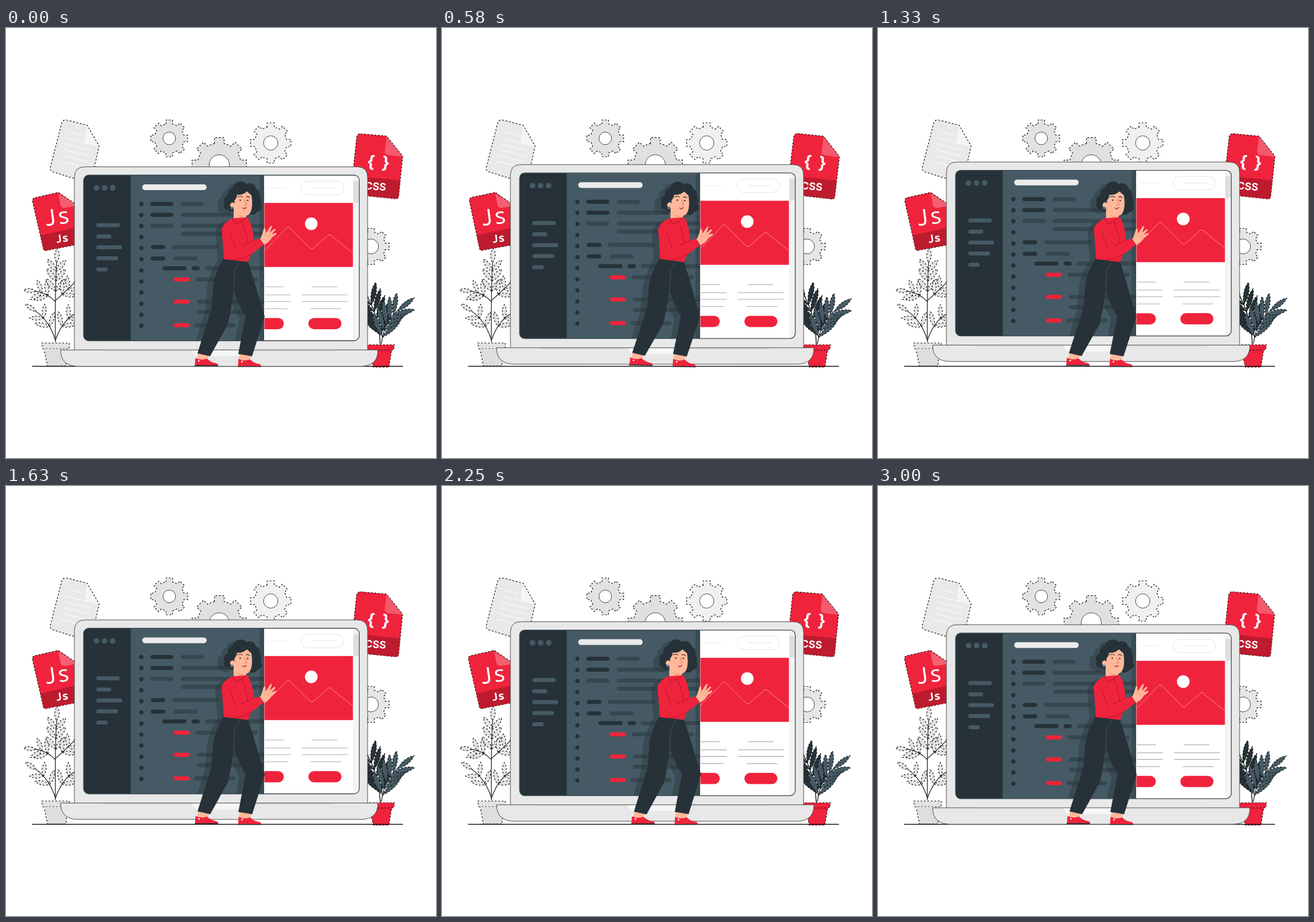
An HTML page that plays this animation: 748 px wide and 748 px high, repeating every 3.04 s.

```html
<!DOCTYPE html>
<html lang="en">
<head>
<meta charset="utf-8">
<title>Web development</title>
<style>
html, body { margin: 0; width: 100%; height: 100%; overflow: hidden; background: #fff; }
svg { display: block; width: 100vw; height: 100vh; }
.rough { stroke: #111; stroke-width: 1.2; stroke-dasharray: 3 3; }
text { fill: #fff; font-family: Inter, Lato, sans-serif; font-weight: 700; }
.mono { font-family: "Noto Sans Mono", "DejaVu Sans Mono", monospace; }
.big { font-weight: 400; }
</style>
</head>
<body>
<svg id="stage" viewBox="0 0 748 748" xmlns="http://www.w3.org/2000/svg"></svg>
<script>
const RED = '#f0233c', DEEP = '#bd1b2e', INK = '#263238', SLATE = '#455a64',
  MID = '#37474f', PALE = '#e8e8e8', SKIN = '#ffb89a';
const LOOP = 3040;

const path = (d, fill, extra = '') => `<path d="${d}" fill="${fill}" ${extra}/>`;
const rough = (d, fill) => path(d, fill, 'class="rough"');
const line = (d, color, w = 1.1) => path(d, 'none', `stroke="${color}" stroke-width="${w}" stroke-linecap="round" stroke-linejoin="round"`);
const rect = (x, y, w, h, fill, r = 0, extra = '') =>
  `<rect x="${x}" y="${y}" width="${w}" height="${h}" rx="${r}" fill="${fill}" ${extra}/>`;
const dot = (x, y, r, fill) => `<circle cx="${x}" cy="${y}" r="${r}" fill="${fill}"/>`;
const bar = (x1, x2, y, fill, h = 7) => rect(x1, y - h / 2, x2 - x1, h, fill, h / 2);
const label = (str, x, y, deg, size, extra = '') =>
  `<text transform="translate(${x} ${y}) rotate(${deg})" font-size="${size}" ${extra}>${str}</text>`;
const group = (id, body) => `<g id="${id}">${body}</g>`;
const ring = (x, y, r) => `M${x - r} ${y}a${r} ${r} 0 1 1 ${2 * r} 0a${r} ${r} 0 1 1 ${-2 * r} 0Z`;
const polar = (x, y, r, deg) => {
  const a = deg * Math.PI / 180;
  return `${(x + r * Math.cos(a)).toFixed(1)} ${(y + r * Math.sin(a)).toFixed(1)}`;
};

function gear(x, y, R, hole, fill) {
  const r = R * 0.79;
  let d = '';
  for (let i = 0; i < 8; i++) {
    const a = i * 45 - 90;
    d += i ? `A${r} ${r} 0 0 1 ${polar(x, y, r, a - 13)}` : `M${polar(x, y, r, a - 13)}`;
    d += `L${polar(x, y, R, a - 10)}L${polar(x, y, R, a + 10)}L${polar(x, y, r, a + 13)}`;
  }
  d += `A${r} ${r} 0 0 1 ${polar(x, y, r, -103)}Z`;
  return rough(d, fill) + path(ring(x, y, hole), '#fff', 'stroke="#333" stroke-width=".9"');
}

function leaf(x, y, deg, len, w, fill) {
  const tip = polar(x, y, len, deg);
  const side = s => polar(x, y, len * 0.6, deg + s * Math.atan2(w, len * 0.6) * 57.3);
  return rough(`M${x} ${y}Q${side(1)} ${tip}Q${side(-1)} ${x} ${y}Z`, fill);
}

// A curved stem with leaf pairs and one leaf at the tip.
function branch([x0, y0, x1, y1, x2, y2], n, len, w, spread, fill, stem, start = 0.3) {
  let out = '';
  for (let i = 0; i <= n; i++) {
    const t = start + (1 - start) * i / n, u = 1 - t;
    const x = +(u * u * x0 + 2 * u * t * x1 + t * t * x2).toFixed(1);
    const y = +(u * u * y0 + 2 * u * t * y1 + t * t * y2).toFixed(1);
    const deg = Math.atan2(u * (y1 - y0) + t * (y2 - y1), u * (x1 - x0) + t * (x2 - x1)) * 57.3;
    const size = len * (1 - 0.2 * t);
    const turns = i === n ? [0] : [-spread, spread];
    out += turns.map(s => leaf(x, y, deg + s, size, w, fill)).join('');
  }
  return out + line(`M${x0} ${y0}Q${x1} ${y1} ${x2} ${y2}`, stem, 1.4);
}

function leftPlant() {
  const stems = [
    [[86, 546, 85, 460, 88, 408], 3, 31, 9, 38, 0.58],
    [[86, 476, 70, 460, 52, 458], 2, 27, 8, 50, 0.4],
    [[86, 474, 100, 462, 118, 444], 2, 27, 8, 48, 0.4],
    [[86, 543, 76, 510, 52, 493], 2, 28, 8, 48, 0.4],
    [[86, 543, 98, 508, 122, 496], 2, 28, 8, 48, 0.4]
  ];
  return stems.map(([p, n, len, w, s, t]) => branch(p, n, len, w, s, '#e2e2e2', '#333', t)).join('') +
    rough('M66 557L72 588H104L108 557Z', '#dedede') + rough('M62 548H110V558H64Z', '#e2e2e2') +
    line('M66 559H108', '#f4f4f4');
}

function rightPlant() {
  const pot = rough('M632 559L639 590H666L671 559Z', RED) + rough('M620 551H676L674 560H622Z', RED) +
    line('M632 561H671', DEEP);
  const fronds = branch([651, 550, 649, 505, 630, 470], 5, 48, 9, 35, INK, '#111', 0.2) +
    branch([653, 549, 658, 510, 681, 492], 5, 46, 9, 34, SLATE, INK, 0.15);
  return group('fronds', fronds) + pot;
}

const paper = () => rough('M105 160L141 169L162 205L148 268L119 262L81 250Q76 248 77 243L97 165Q99 159 105 160Z', '#e9e9e9') +
  path('M141 170L137 193Q136 199 142 201L161 206Z', '#f5f5f5') +
  [[111, 181, 20], [107, 192, 36], [104, 202, 42], [102, 212, 42], [99, 222, 42], [96, 232, 30]]
    .map(([x, y, w]) => line(`M${x} ${y}l${w} ${w / 4}`, '#f8f8f8', 1.8)).join('');

const jsFile = () => rough('M51 295L91 286L125 309L132 375L70 387Q66 388 65 384L46 301Q46 296 51 295Z', RED) +
  path('M60 361L130 345V375L70 387Q66 388 65 384Z', DEEP) +
  path('M91 288L95 308Q96 313 102 313L125 309Z', '#f55f72') +
  label('Js', 67, 345, -8, 39, 'class="mono big"') + label('Js', 87, 374, -8, 19, 'class="mono"');

const cssFile = () => rough('M617 184L662 188L690 223L683 293Q682 298 677 297L606 290L600 284L610 190Q611 184 617 184Z', RED) +
  path('M604 257L686 265L683 293Q682 298 677 297L602 289Z', DEEP) +
  path('M662 189L659 215Q659 220 664 221L690 224Z', '#f4596d') +
  label('{', 627, 242, 6, 29) + label('}', 653, 244, 6, 29) + label('CSS', 624, 280.5, 4, 18);

const hair = [[408, 281, 14], [424, 281, 11], [398, 289, 12], [388, 300, 9], [386, 309, 7], [395, 311, 9],
  [432, 289, 10], [434, 300, 10], [436, 311, 9], [429, 316, 9]].map(c => ring(...c)).join('');
const torso = 'M394 331Q379 337 375 350Q378 380 379 402L421 407L426 394L448 377L442 366L431 369Q429 342 420 329Z';
const pants = 'M378 401Q364 425 361 445L357 490L333 566L355 571L386 515Q392 490 396 456Q407 488 417 501L404 567L428 571L450 502Q438 460 421 406Z';
const shade = hair + torso + pants;

function screen() {
  const code = [
    [306, 251, 291, INK], [306, 304, 344, MID], [325, 251, 291, INK], [325, 304, 398, MID],
    [344, 251, 291, MID], [344, 304, 460, MID], [358, 304, 460, MID],
    [381, 252, 277, INK], [381, 289, 371, MID], [401, 252, 277, INK], [401, 292, 333, MID],
    [418, 272, 314, INK], [418, 323, 337, INK], [418, 346, 460, MID],
    [437.5, 292, 320, RED], [437.5, 330, 438, MID], [476, 292, 320, RED], [476, 332, 460, MID],
    [494, 332, 460, MID], [517, 292, 320, RED], [517, 328, 399, MID]
  ];
  const side = [[343, 198], [362.5, 183], [381.5, 202], [400.5, 195], [420, 177]];
  let s = rect(135, 256, 315, 288, SLATE) + rect(135, 256, 82, 288, INK);
  s += [157.5, 171.5, 185.5].map(x => dot(x, 278, 5, SLATE)).join('');
  s += side.map(([y, x]) => bar(157, x, y, SLATE)).join('');
  s += bar(237, 349, 277, '#ebebeb', 10);
  for (let i = 0; i < 12; i++) s += dot(235.5, 306 + i * 19.27, 3.7, INK);
  s += code.map(([y, a, b, c]) => bar(a, b, y, c)).join('');
  s += rect(441, 256, 9, 288, INK, 0, 'opacity=".35"');
  s += `<g clip-path="url(#codeClip)">${path(shade, INK, 'id="shade" opacity=".4"')}</g>`;
  return s + page();
}

function page() {
  const copy = [[450.3, 451, 483, 532, 576], [464.3, 451, 495, 515, 594], [475.8, 451, 495, 515, 594], [488.3, 451, 490, 530, 583]];
  let s = rect(449, 256, 165, 288, '#fff') + rect(604, 256, 10, 288, '#f4f4f4') + rect(604, 266, 9.5, 38, '#dedede', 3);
  s += line('M455 278H488', '#ededed') + rect(513.5, 266.5, 74, 23.5, 'none', 11.5, 'stroke="#e3e3e3"') + line('M532 278H572', '#e6e6e6');
  s += rect(449.5, 304.3, 154, 111.4, RED) + dot(531, 340.5, 11, '#fff');
  s += line('M450 387L487 349Q491 344 495 349L528 382Q532 387 536 382L559 362Q563 357 567 362L603 391', '#f98d99', 1);
  s += copy.map(([y, a, b, c, d]) => line(`M${a} ${y}H${b}M${c} ${y}H${d}`, '#aaa')).join('');
  return s + path('M449.5 504.5H473.5a9.7 9.7 0 0 1 0 19.5H449.5Z', RED) + bar(526, 583.5, 514.2, RED, 19.5);
}

function laptop() {
  const edge = 'stroke="#4a4a4a" stroke-width="1"';
  return path('M119 561V260Q119 241.5 137 241.5H611Q629 241.5 629 260V561Z', PALE, edge) +
    `<g clip-path="url(#screenClip)">${screen()}</g>` +
    rect(135, 256, 479.5, 288, 'none', 9, `stroke="${MID}" stroke-width="1.3"`) +
    path('M95 560H647Q647 588.5 617 588.5H126Q95 588.5 95 560Z', PALE, edge) +
    path('M323 561H412Q410 571 401 571H336Q326 571 323 561Z', '#f6f6f6') +
    line('M170 561.5H323M412 561.5H570', '#d6d6d6', 1.5);
}

function shoe(x, y) {
  return path(`M${x} ${y}Q${x + 10} ${y + 5} ${x + 20} ${y + 1}Q${x + 27} ${y + 8} ${x + 36} ${y + 9}Q${x + 40} ${y + 10} ${x + 39} ${y + 13}H${x - 1}Z`, RED) +
    line(`M${x - 1} ${y + 13.3}H${x + 39}`, INK, 1.5) + dot(x + 6, y + 5, 1.4, '#fff');
}

function woman() {
  const fingers = 'M442 367Q446 360 448 350L451 348L452 357L460 345L463 344L459 356L467 349L469 351L462 359L470 356L470 359L462 365Q459 372 449 377Z';
  let s = path('M334 565L352 569L350 578Q341 582 332 575ZM406 566L426 570L424 579Q415 582 405 577Z', SKIN);
  s += shoe(329.5, 574) + shoe(404.5, 575.5) + path(pants, INK);
  s += line('M405 408Q404 418 396 422M398 424L396 456', '#4a5a62', 0.9);
  s += path(hair, INK);
  s += path('M396 308V334Q405 341 418 331V318Z', SKIN) + path('M400 324Q409 329 417 326L409 329Z', '#e8957a');
  s += path('M397 294C403 281 424 281 427 291C429 304 429 317 423 324C416 330 404 327 399 318Z', SKIN);
  s += dot(394.5, 308, 4.6, SKIN) + dot(393, 313, 2.3, '#607d8b');
  s += path('M395 302Q401 298 402 290Q413 291 419 284Q424 289 430 293L429 277L402 276L392 290Z', INK);
  s += dot(407.5, 299.5, 1.3, INK) + dot(420.5, 300, 1.3, INK);
  s += line('M403 294Q407 291 411 294M418 294Q421 292 424 295', INK, 1.2);
  s += line('M415 299L419 307L414.5 308.5', '#d9775f', 1) + line('M412 313Q415 316 418 312', '#b5303c', 1.6);
  s += path(torso, RED) + path(fingers, SKIN) + line('M452 357L450 362M459 356L454 363M462 359L456 366', '#e8957a', 0.8);
  s += line('M394 331L400 341L410 336L418 330M410 336Q419 356 420 374M389 354Q396 374 400 383M410 379L431 369M395 403Q409 404 425 394', '#b5182c', 1);
  return s;
}

const clip = (id, box) => `<clipPath id="${id}">${box}</clipPath>`;
document.getElementById('stage').innerHTML =
  '<defs>' + clip('screenClip', rect(135, 256, 479.5, 288, '#000', 9)) + clip('codeClip', rect(217, 256, 233, 288, '#000')) + '</defs>' +
  gear(284, 192, 32.5, 11, '#e2e2e2') + gear(460.5, 200, 35.5, 12.5, '#f0f0f0') +
  gear(371, 238, 48, 17.5, '#e0e0e0') + gear(635, 380, 32, 13, '#e6e6e6') +
  paper() + leftPlant() + group('js', jsFile()) + group('css', cssFile()) + rightPlant() +
  line('M46 588.5H690', '#111', 1.5) + group('laptop', laptop()) + group('woman', woman());

const el = id => document.getElementById(id);
const set = (id, t) => el(id).setAttribute('transform', t);

function draw(t) {
  const p = 1 - Math.abs(t / (LOOP / 2) - 1);
  const ease = (Math.sin(p * Math.PI / 2) + (1 - Math.cos(p * Math.PI)) / 2) / 2;
  const lift = -8.6 * ease;
  const wave = Math.sin(t / LOOP * Math.PI * 2);
  const sway = wave * (wave > 0 ? 1 : 0.4);
  const nudge = Math.max(sway, -0.1);
  const lean = `rotate(${0.9 * sway} 400 420)`;
  set('laptop', `translate(0 ${lift})`);
  set('woman', lean);
  set('shade', `translate(-11 ${4 - lift}) ${lean}`);
  set('js', `rotate(${0.95 * nudge} 95 400)`);
  set('css', `rotate(${0.95 * nudge} 645 310)`);
  set('fronds', `rotate(${1.6 * nudge} 652 550)`);
}

const begin = performance.now();
function tick() {
  draw((performance.now() - begin) % LOOP);
  requestAnimationFrame(tick);
}
draw(0);
requestAnimationFrame(tick);
</script>
</body>
</html>
```
